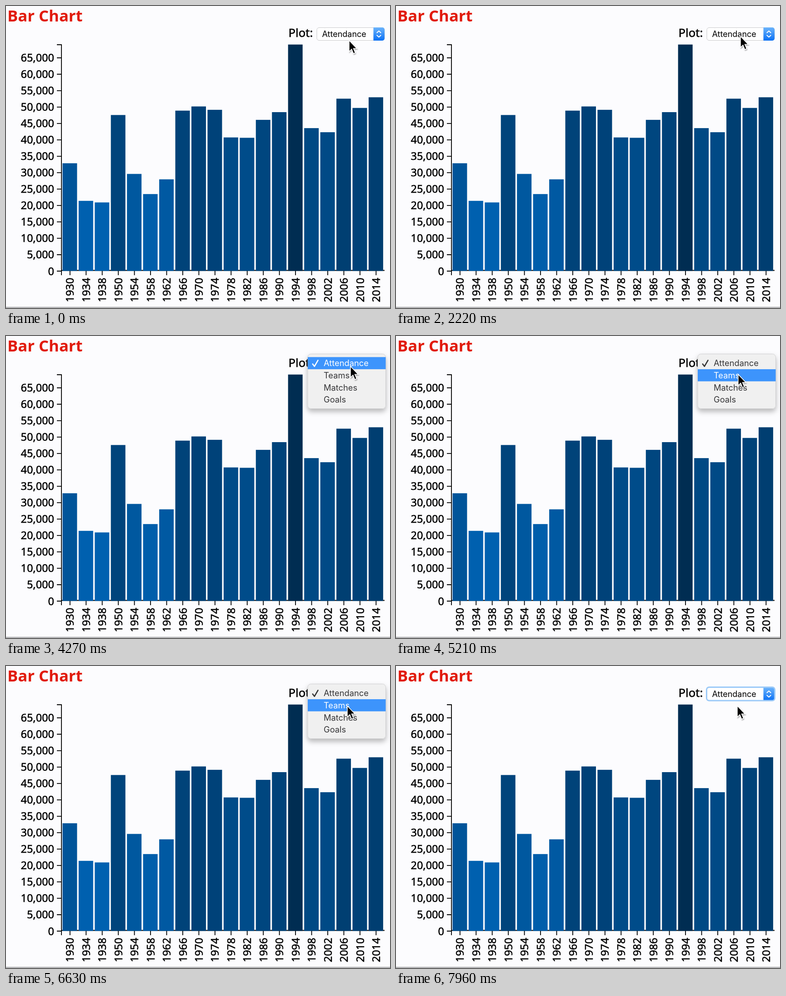
An HTML page for the animation above (8000 ms loop, 845 px wide and 663 px high).

```html
<!DOCTYPE html>
<html lang="en">
<head>
<meta charset="utf-8">
<title>Bar Chart</title>
<style>
  html, body { margin: 0; width: 100%; height: 100%; overflow: hidden; background: #fcfcfe; }
  svg { display: block; width: 845px; height: 663px; }
  .label, .plot { font: 23.5px "Noto Sans", "Open Sans", sans-serif; stroke: #000; stroke-width: .55; }
  .label { text-anchor: end; }
  .plot { font-size: 25.7px; }
  .title { font: 800 34.7px "Noto Sans", "Open Sans", sans-serif; fill: #e11b0c; }
  .ui { font: 18px Inter, Roboto, sans-serif; }
  .item { font-size: 18.3px; }
  .axis { fill: none; stroke: #000; stroke-width: 1.8; }
</style>
</head>
<body>
<svg viewBox="0 0 845 663">
  <defs>
    <linearGradient id="blue" x2="0" y2="1">
      <stop stop-color="#6cb4fb"/><stop offset="1" stop-color="#0a70f5"/>
    </linearGradient>
    <filter id="menuShadow" x="-20%" y="-20%" width="140%" height="150%">
      <feDropShadow dx="0" dy="6" stdDeviation="6" flood-opacity=".28"/>
    </filter>
    <filter id="softShadow" x="-50%" y="-30%" width="220%" height="180%">
      <feDropShadow dx="1" dy="2" stdDeviation="1.3" flood-opacity=".35"/>
    </filter>
  </defs>
  <rect width="845" height="663" fill="#fcfcfe"/>
  <text class="title" x="3" y="34">Bar Chart</text>
  <text class="plot" x="621.5" y="68">Plot:</text>
  <g id="chart"></g>
  <path d="M0 661.5H845" stroke="#8b8b8d" stroke-width="1.6"/>

  <g id="select">
    <rect x="684" y="47.5" width="149" height="28" rx="5" fill="#fff" stroke="#c9c9cb"/>
    <path d="M808.5 47H828a5 5 0 0 1 5 5V71a5 5 0 0 1-5 5H808.5Z" fill="url(#blue)"/>
    <path d="M816.2 58.7l4.3-4 4.3 4M816.2 64.3l4.3 4 4.3-4" fill="none" stroke="#fff" stroke-width="1.9" stroke-linecap="round" stroke-linejoin="round"/>
    <rect id="focus" x="683.5" y="46.5" width="150" height="29.5" rx="5.5" fill="none" stroke="#9ccaf8" stroke-width="3"/>
    <text class="ui" x="695.5" y="68">Attendance</text>
  </g>

  <g id="menu">
    <rect x="664" y="39.5" width="171.5" height="120" rx="7" fill="#f0f0f0" stroke="#cacacc" stroke-width=".8" filter="url(#menuShadow)"/>
    <rect id="highlight" x="664" width="171.5" height="26.6" fill="#3d94fc"/>
    <path id="check" d="M674.8 61.5l4 5.2 7.7-13.4" fill="none" stroke-width="2.6" stroke-linecap="round" stroke-linejoin="round"/>
  </g>

  <path id="cursor" d="M0 0V24.5L5.6 19.2 9.6 29 13.6 27.3 9.6 17.8H17Z" stroke="#fff" stroke-width="1.5" filter="url(#softShadow)"/>
</svg>
<script>
const LOOP = 8000, MENU_OPEN = 3160, MENU_CLOSE = 7440;
const ROW = 26.6, BASE = 582, PX_PER_PERSON = 36.02 / 5000;
const attendance = {
  1930: 32808, 1934: 21353, 1938: 20872, 1950: 47511, 1954: 29562,
  1958: 23423, 1962: 27912, 1966: 48848, 1970: 50124, 1974: 49099,
  1978: 40679, 1982: 40572, 1986: 46039, 1990: 48389, 1994: 68991,
  1998: 43517, 2002: 42269, 2006: 52491, 2010: 49670, 2014: 52918
};
// Cursor stops: time, x, y
const path = [
  [0, 755, 75.5], [150, 755, 75.5], [800, 758, 66.5], [4450, 758, 66.5],
  [5150, 753, 84], [5600, 751, 87.5], [LOOP, 751, 87.5]
];

const byId = id => document.getElementById(id);
function add(parent, tag, attrs, text = "") {
  const node = document.createElementNS("http://www.w3.org/2000/svg", tag);
  for (const name in attrs) node.setAttribute(name, attrs[name]);
  node.textContent = text;
  return parent.appendChild(node);
}
const mix = (a, b, t) => a + (b - a) * t;

function drawChart() {
  const chart = byId("chart"), values = Object.values(attendance);
  const low = Math.min(...values), high = Math.max(...values);
  const axis = add(chart, "path", { class: "axis" });
  let lines = "M112 85H122V582H112M122 591V580.5H833";
  Object.entries(attendance).forEach(([year, value], i) => {
    const x = 124.4 + 35.45 * i, y = BASE - value * PX_PER_PERSON;
    const t = (value - low) / (high - low);
    const fill = `rgb(0 ${mix(97, 45, t)} ${mix(176, 82, t)})`;
    add(chart, "rect", { x, y: y - .4, width: 32, height: BASE - y, fill });
    add(chart, "text", { class: "label", transform: `translate(${x + 25} 596.5) rotate(-90)` }, year);
    lines += `M${x + 16.4} 581V591`;
  });
  for (let value = 0; value <= 65000; value += 5000) {
    const y = BASE - value * PX_PER_PERSON;
    add(chart, "text", { class: "label", x: 106, y: y + 8.5 }, value.toLocaleString("en-US"));
    lines += `M112 ${y}H122`;
  }
  axis.setAttribute("d", lines);
}

drawChart();
const items = ["Attendance", "Teams", "Matches", "Goals"].map((name, i) =>
  add(byId("menu"), "text", { class: "ui item", x: 699, y: 66.3 + ROW * i }, name));

function cursorAt(time) {
  const i = path.findIndex(stop => stop[0] > time);
  const [t0, x0, y0] = path[i - 1], [t1, x1, y1] = path[i];
  const p = (time - t0) / (t1 - t0), eased = p * p * (3 - 2 * p);
  return [mix(x0, x1, eased), mix(y0, y1, eased)];
}

function render(time) {
  const [x, y] = cursorAt(time);
  const open = time >= MENU_OPEN && time < MENU_CLOSE;
  const row = y < 73 ? 0 : 1;
  byId("cursor").setAttribute("transform", `translate(${x} ${y})`);
  byId("menu").style.display = open ? "" : "none";
  byId("select").style.display = open ? "none" : "";
  byId("focus").style.display = time >= MENU_CLOSE ? "" : "none";
  byId("highlight").setAttribute("y", 46.3 + ROW * row);
  byId("check").setAttribute("stroke", row ? "#333" : "#fff");
  items.forEach((item, i) => item.setAttribute("fill", i === row ? "#fff" : "#363638"));
}

const start = performance.now();
function frame() {
  render((performance.now() - start) % LOOP);
  requestAnimationFrame(frame);
}
frame();
</script>
</body>
</html>
```
